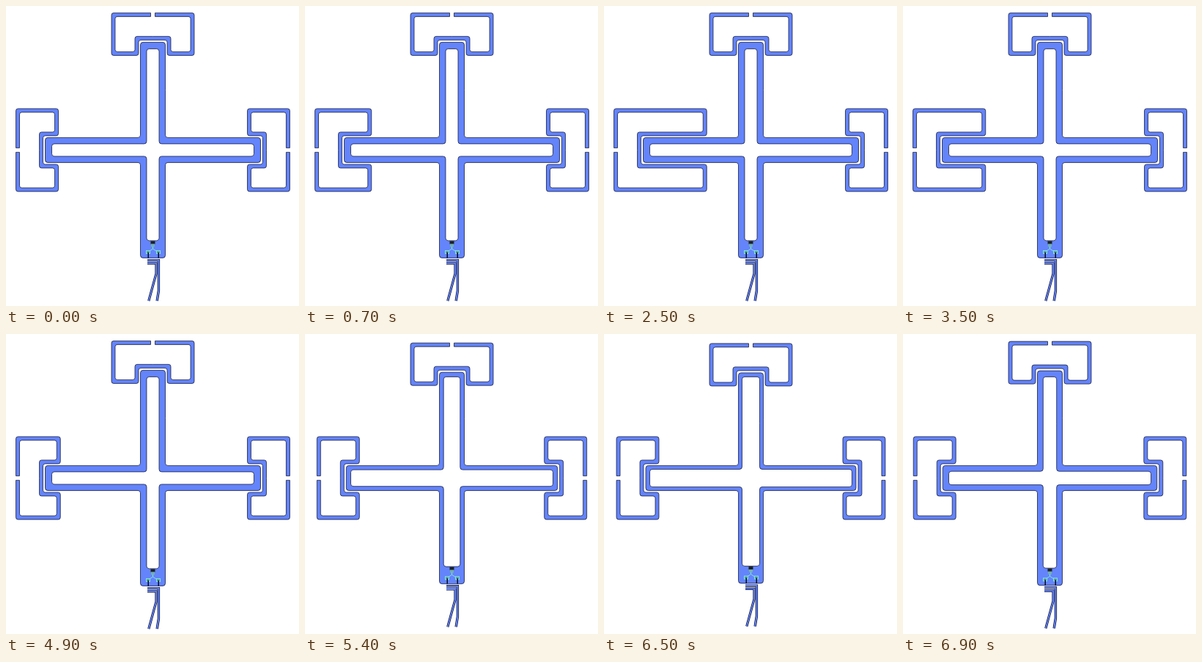
Recreate the animation shown at these times as an HTML page with a canvas. Size 400x409 px, loop 7 s.

```html
<!DOCTYPE html>
<html>
<head>
<meta charset="utf-8">
<style>
html, body { margin: 0; width: 100%; height: 100%; overflow: hidden; background: #fff; }
canvas { display: block; }
</style>
</head>
<body>
<canvas id="stage" width="400" height="409"></canvas>
<script>
const ctx = document.getElementById('stage').getContext('2d');
const BLUE = '#6484fb', EDGE = '#060a24', CYAN = '#7fe3e0';
const CX = 200.5, CY = 196.4, EDGE_WIDTH = 0.7;

// Closed outline with rounded corners; a point may carry its own radius.
function shape(points, fill, radius = 3) {
  const last = points[points.length - 1], first = points[0];
  ctx.beginPath();
  ctx.moveTo((last[0] + first[0]) / 2, (last[1] + first[1]) / 2);
  points.forEach(([x, y, r = radius], i) => {
    const next = points[(i + 1) % points.length];
    ctx.arcTo(x, y, next[0], next[1], r);
  });
  ctx.closePath();
  ctx.fillStyle = fill;
  ctx.fill();
  ctx.strokeStyle = EDGE;
  ctx.lineWidth = EDGE_WIDTH;
  ctx.stroke();
}

// Arm lengths in the order right, bottom, left, top.
function cross(half, lengths, fill) {
  const points = [];
  lengths.forEach((len, turn) => {
    for (let [x, y] of [[half, -half], [len, -half], [len, half]]) {
      for (let i = 0; i < turn; i++) [x, y] = [-y, x];
      points.push([x, y]);
    }
  });
  shape(points, fill, 3.5);
}

// Split resonator around the end of an arm that points along +x.
function resonator(angle, shift, extension) {
  const tip = 129 - extension;
  const half = [
    [155, 24.5], [tip + 5, 24.5], [tip + 5, 51.5], [182, 51.5], [182, 3, 0],
    [187, 3, 0], [187, 56.5], [tip, 56.5], [tip, 19.5], [150, 19.5]
  ];
  const mirrored = half.map(([x, y, r]) => [x, -y, r]).reverse();
  ctx.save();
  ctx.rotate(angle);
  ctx.translate(-shift, 0);
  shape([...half, ...mirrored], BLUE);
  ctx.restore();
}

function line(points, width, color) {
  ctx.beginPath();
  points.forEach(p => ctx.lineTo(...p));
  ctx.lineWidth = width;
  ctx.strokeStyle = color;
  ctx.stroke();
}

function strip(points, width) {
  line(points, width, EDGE);
  line(points, width - 2 * EDGE_WIDTH, BLUE);
}

function rect(x, y, w, h, color) {
  ctx.fillStyle = color;
  ctx.fillRect(x, y, w, h);
}

function chip() {
  rect(197.5, 320.5, 6, 4, '#1a2226');
  rect(198, 324.5, 5, 4, '#6fb0b4');
  line([[200.5, 328], [200.5, 331], [196, 334]], 1, CYAN);
  line([[200.5, 331], [205, 334]], 1, CYAN);
  for (const x of [191, 205]) {
    rect(x, 333, 6, 5, CYAN);
    rect(x + 1, 334, 4, 3, '#5f9fa0');
    rect(x + 2.5, 336, 1.5, 7.5, EDGE);
  }
}

function feed() {
  strip([[193, 346.6], [208.4, 346.6], [208.4, 388], [206.2, 402]], 3.4);
  strip([[193, 350.8], [205, 350.8], [205, 365], [194.8, 402]], 3.2);
}

function draw(time) {
  const step = Math.floor(time % 7000 / 100);
  const extension = 2.75 * Math.max(0, 25 - Math.abs(step - 25));
  const shift = 0.7 * Math.max(0, 10 - Math.abs(step - 60));

  rect(0, 0, 400, 409, '#fff');
  ctx.save();
  ctx.translate(CX, CY);
  resonator(0, shift, 0);
  resonator(Math.PI, shift, extension);
  resonator(-Math.PI / 2, shift, 0);
  cross(17, Array(4).fill(147 - shift), BLUE);
  cross(8.5 + shift, [138, 123.5 - shift, 138, 138], '#fff');
  ctx.restore();

  ctx.save();
  ctx.translate(0, -shift);
  chip();
  feed();
  ctx.restore();
}

const start = performance.now();
function tick() {
  draw(performance.now() - start);
  requestAnimationFrame(tick);
}
tick();
</script>
</body>
</html>
```
